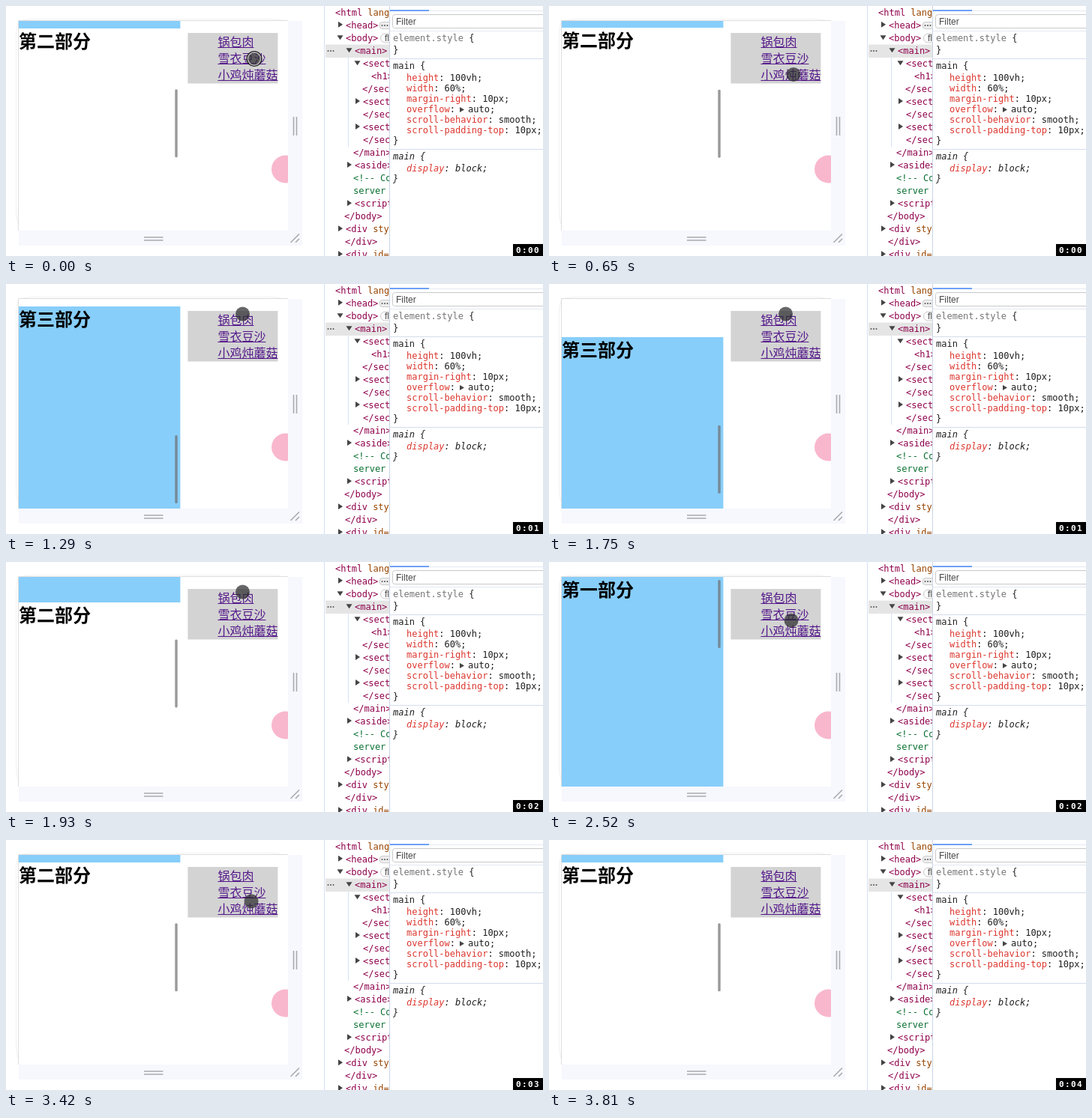
These frames come from a looping animation (716 px wide and 334 px high, 4.02 s). An HTML page:

```html
<!DOCTYPE html>
<html lang="zh">
<head>
<meta charset="utf-8">
<style>
  html, body { margin: 0; width: 100%; height: 100%; overflow: hidden; background: #fff; }
  #stage { display: block; }
  text { white-space: pre; }
  .cjk { font-family: "Noto Sans CJK SC", "Noto Sans CJK", sans-serif; }
  h1, .title { font-size: 24px; font-weight: bold; }
  .link { font-size: 16px; fill: #551a8b; }
  .code { font: 12px "DejaVu Sans Mono", monospace; fill: #1f1f1f; }
  .tag { fill: #8e004b; }
  .attr { fill: #994500; }
  .note { fill: #0a7032; }
  .prop { fill: #dc362e; }
  .dim { fill: #757575; }
  .italic { font-style: italic; }
  .ui { font: 12px "Liberation Sans", Arial, sans-serif; fill: #474747; }
  #clock { font: bold 11px "DejaVu Sans Mono", monospace; letter-spacing: 1.4px; fill: #fff; }
</style>
</head>
<body>
<svg id="stage" width="716" height="334" viewBox="0 0 716 334">
  <rect width="716" height="334" fill="#fff"/>

  <!-- Page preview -->
  <path d="M17 293Q13.500 285 13.500 270V40Q13.500 25 18 20Q26 17.500 40 17.500H350Q362 17.500 367 19" fill="none" stroke="#f1f1f1"/>
  <path d="M16.500 300V19.500H376" fill="none" stroke="#dedede"/>
  <path d="M376 20H395V320H17V300H376Z" fill="#f7f8fd"/>
  <g stroke="#a9abae" stroke-width="1.600" fill="none">
    <path d="M383.500 148V173M387.500 148V173M184 309H209.500M184 313H209.500M379.500 316L391 304.500M386 316L391 311"/>
  </g>
  <rect x="242.400" y="36" width="120" height="67.500" fill="#d3d3d3"/>
  <g id="links" class="cjk link"></g>
  <svg x="17" y="20" width="359" height="280">
    <circle cx="355.500" cy="198" r="18.500" fill="#f8b7cd"/>
  </svg>
  <svg x="17" y="20" width="215.400" height="280">
    <g id="sections" class="cjk title"></g>
    <rect id="thumb" x="208.300" width="3.400" height="91" rx="1.500" fill="#6e6e6e" fill-opacity=".7"/>
  </svg>

  <!-- Element tree -->
  <path d="M424.500 0V334" stroke="#d3e0f8"/>
  <rect x="426" y="51.500" width="85.500" height="17.500" fill="#e5e5e5"/>
  <path d="M456.500 69V188" stroke="#d6e2f6"/>
  <svg width="511" height="334">
    <rect x="498" y="21.500" width="20" height="9" rx="4" fill="#eee" stroke="#ccc"/>
    <rect x="499.500" y="37" width="30" height="12" rx="6" fill="#fff" stroke="#c7c7c7"/>
    <text x="505" y="47" class="ui" font-size="11">flex</text>
    <g fill="#555">
      <circle cx="501.500" cy="26" r="1"/><circle cx="505" cy="26" r="1"/><circle cx="508.500" cy="26" r="1"/>
      <circle cx="429.500" cy="60" r="1"/><circle cx="433" cy="60" r="1"/><circle cx="436.500" cy="60" r="1"/>
    </g>
    <g id="tree" class="code"></g>
  </svg>

  <!-- Style rules -->
  <path d="M511.500 0V334" stroke="#c9d3e6"/>
  <path d="M512 6.500H716M512 33.500H716" stroke="#e3e8f2"/>
  <path d="M512 6H564" stroke="#4285f4" stroke-width="1.600"/>
  <rect x="515.500" y="11.500" width="210" height="18" rx="3" fill="#fff" stroke="#c9c9cd"/>
  <text x="520" y="24.500" class="ui">Filter</text>
  <path d="M512 70.500H716M512 191.500H716" stroke="#d5dded"/>
  <g id="rules" class="code"></g>
  <path d="M605 135L611 138.500L605 142Z" fill="#444"/>

  <g id="cursor">
    <circle r="9.500" fill="#2b2b2e" fill-opacity=".72"/>
    <g id="press" fill="none">
      <circle r="8.600" stroke="#b5b5b5" stroke-width="1.600"/>
      <circle r="10" stroke="#1c1c1c" stroke-width="1.200"/>
    </g>
  </g>
  <rect x="676" y="318" width="40" height="16"/>
  <text id="clock" x="680" y="329.500"></text>
</svg>

<script>
const byId = id => document.getElementById(id);
const escapeText = s => s.replace(/&/g, '&amp;').replace(/</g, '&lt;');
const span = (cls, s) => `<tspan class="${cls}">${escapeText(s)}</tspan>`;
const label = (x, y, inner, cls = '') => `<text x="${x}" y="${y}" class="${cls}">${inner}</text>`;

byId('links').innerHTML = ['锅包肉', '雪衣豆沙', '小鸡炖蘑菇'].map((s, i) => {
  const y = 53.5 + i * 22.4;
  return label(282.4, y, s) +
    `<rect x="282.4" y="${Math.round(y + 1)}" width="${s.length * 16}" height="1"/>`;
}).join('');

const PAGE = 280;
byId('sections').innerHTML = ['一', '二', '三'].map((n, i) =>
  `<rect y="${i * PAGE}" width="216" height="${PAGE}" fill="${i % 2 ? '#fff' : '#87cefa'}"/>` +
  label(0, i * PAGE + 26, `第${n}部分`)).join('');

// [x, text, arrow]: arrow is 'r' (closed), 'd' (open) or absent
const treeRows = [
  [439, '<html'], [453, '<head>', 'r'], [453, '<body>', 'd'], [465, '<main>', 'd'],
  [476, '<section>', 'd'], [487, '<h1>'], [475, '</section>'],
  [476, '<section>', 'r'], [476, '</section>'], [476, '<section>', 'r'], [476, '</section>'],
  [463, '</main>'], [465, '<aside>', 'r'], [463, '<!-- Code'], [463, 'server'],
  [465, '<script', 'r'], [451, '</body>'], [453, '<div', 'r'], [452, '</div>'], [453, '<div', 'r']
];
const attributes = { 0: ' lang', 17: ' style', 19: ' id=' };
byId('tree').innerHTML = treeRows.map(([x, s, arrow], i) => {
  const y = 12.7 + i * 17.03;
  const cls = i === 13 || i === 14 ? 'note' : 'tag';
  const shape = arrow === 'r' ? 'M-2.5 -4L3.5 0L-2.5 4Z' : 'M-4 -2.500H4L0 3.500Z';
  return label(x, y, span(cls, s) + span('attr', attributes[i] || '')) +
    (arrow ? `<path d="${shape}" transform="translate(${x - 7.5} ${y - 5})" fill="#444"/>` : '');
}).join('');

const declaration = (name, value, y, cls) =>
  label(534, y, span('prop', name) + `: ${value};`, cls);
byId('rules').innerHTML =
  label(516, 47, span('dim', 'element.style') + ' {') + label(516, 62.5, '}') +
  label(516, 83.5, 'main {') +
  [['height', '100vh'], ['width', '60%'], ['margin-right', '10px'], ['overflow', '  auto'],
   ['scroll-behavior', 'smooth'], ['scroll-padding-top', '10px']]
    .map(([name, value], i) => declaration(name, value, 100 + i * 14)
      .replace('  auto', '<tspan x="616">auto</tspan>')).join('') +
  label(516, 183.5, '}') +
  label(516, 205, 'main {', 'italic') + declaration('display', 'block', 221, 'italic') +
  label(516, 235, '}', 'italic');

const LOOP = 4020;
const scrolls = [ // start, duration, from, to
  [637, 370, 270, 550], [1650, 530, 550, 0], [2980, 390, 0, 270]
];
const presses = [[0, 50], [500, 650], [1490, 1640], [2870, 2980]];
const path = [ // time, x, y
  [0, 331, 70.5], [50, 331, 70.5], [470, 326, 91.5], [1050, 326, 91.5], [1170, 324, 65],
  [1230, 318, 48], [1290, 315.5, 40], [2170, 315.5, 40], [2340, 318, 60], [2520, 323, 78],
  [2660, 327, 81.5], [3420, 327, 81.5], [3600, 331, 130], [3800, 345, 345], [LOOP, 345, 345]
];

// cubic-bezier(.42, 0, .58, 1)
function easeInOut(p) {
  let s = p;
  for (let i = 0; i < 5; i++) {
    s -= (1.26 * s - 0.78 * s * s + 0.52 * s ** 3 - p) / (1.26 - 1.56 * s + 1.56 * s * s);
  }
  return s * s * (3 - 2 * s);
}

function scrollAt(t) {
  let top = 270;
  for (const [start, duration, from, to] of scrolls) {
    if (t >= start) top = from + (to - from) * easeInOut(Math.min(1, (t - start) / duration));
  }
  return Math.round(top);
}

function cursorAt(t) {
  const i = path.findIndex(key => key[0] > t);
  const [t0, x0, y0] = path[i - 1], [t1, x1, y1] = path[i];
  const p = (t - t0) / (t1 - t0);
  return [x0 + (x1 - x0) * p, y0 + (y1 - y0) * p];
}

function draw() {
  const t = performance.now() % LOOP;
  const top = scrollAt(t);
  byId('sections').setAttribute('transform', `translate(0 ${-top})`);
  byId('thumb').setAttribute('y', 4 + top * 0.3235);
  byId('cursor').setAttribute('transform', `translate(${cursorAt(t)})`);
  const pressed = presses.some(([from, to]) => t >= from && t < to);
  byId('press').setAttribute('visibility', pressed ? 'visible' : 'hidden');
  byId('clock').textContent = '0:0' + Math.max(0, Math.floor((t - 50) / 940));
  requestAnimationFrame(draw);
}
draw();
</script>
</body>
</html>
```
